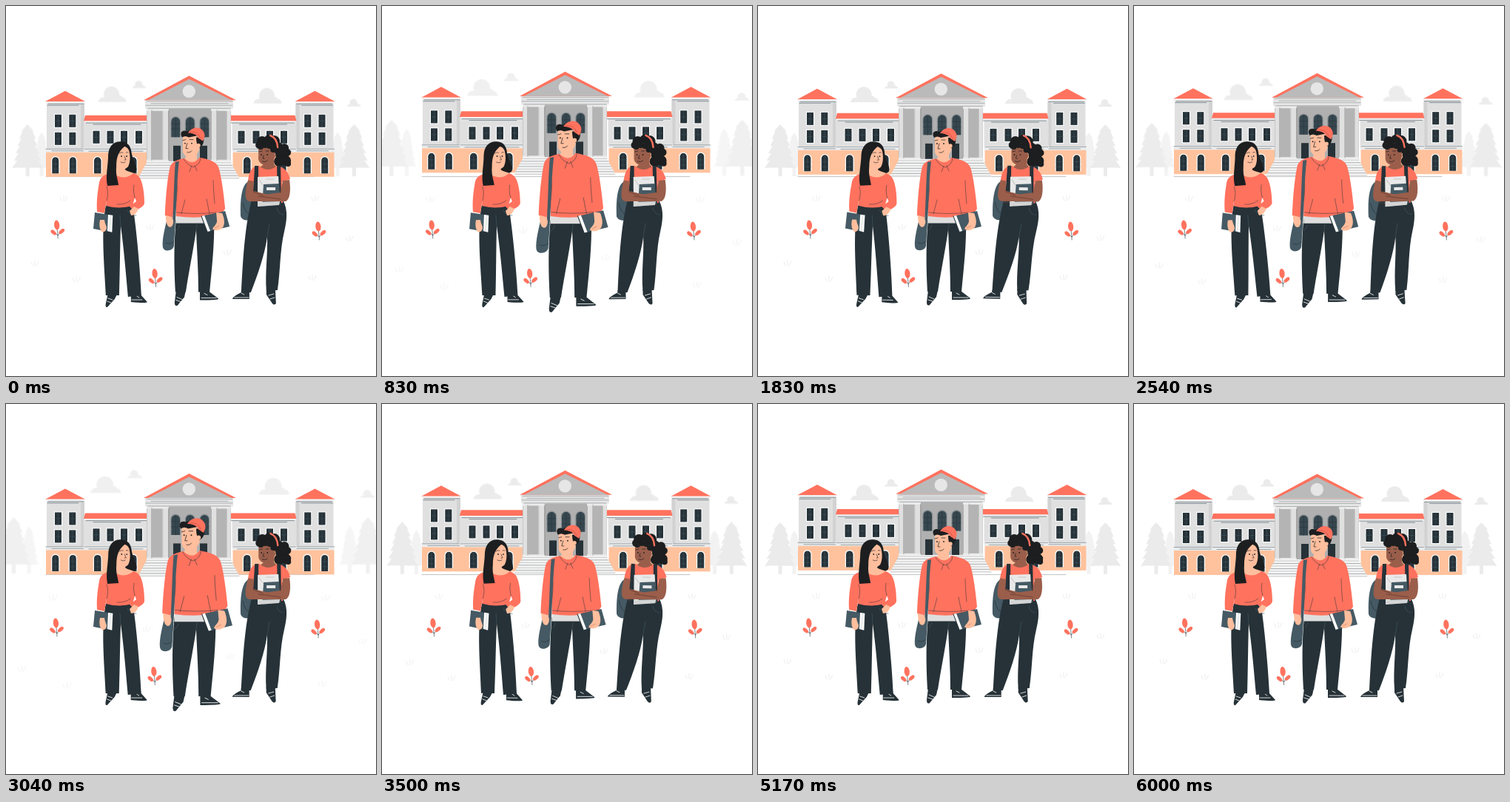
Write an HTML page that moves like this. It is 500 px wide and 500 px high and loops after 6.04 s.

```html
<!DOCTYPE html>
<html lang="en">
<head>
<meta charset="utf-8">
<title>Students on campus</title>
<style>
  html, body { margin: 0; width: 100%; height: 100%; overflow: hidden; background: #fff; }
  svg { display: block; width: 100vw; height: 100vh; }
</style>
</head>
<body>
<svg id="stage" viewBox="0 0 500 500"></svg>
<script>
const coral = '#ff725e', dark = '#263238', slate = '#455a64', ink = '#1c1e20',
  skin = '#ffbe9d', brown = '#9a5e4b', wall = '#e0e0e0', mid = '#c7c7c7', pale = '#ebebeb', peach = '#ffc29d';

const shape = (d, fill) => `<path d="${d}" fill="${fill}"/>`;
const line = (d, color = dark, w = .7) =>
  `<path d="${d}" fill="none" stroke="${color}" stroke-width="${w}" stroke-linecap="round" stroke-linejoin="round"/>`;
const rect = (x, y, w, h, fill) => `<rect x="${x}" y="${y}" width="${w}" height="${h}" fill="${fill}"/>`;
const dot = (x, y, r, fill) => `<circle cx="${x}" cy="${y}" r="${r}" fill="${fill}"/>`;
const oval = (x, y, rx, ry, turn, fill) =>
  `<ellipse rx="${rx}" ry="${ry}" transform="translate(${x} ${y}) rotate(${turn})" fill="${fill}"/>`;
const group = (id, body) => `<g id="${id}">${body}</g>`;
const at = (x, y, body, s = 1) => `<g transform="translate(${x} ${y}) scale(${s})">${body}</g>`;

// ---- scenery ----
function tree(x, top, half, bottom, fill) {
  const tiers = 6, step = (bottom - top) / tiers;
  let left = '', right = '';
  for (let i = 1; i <= tiers; i++) {
    const w = half * (.3 + .7 * i / tiers), y = top + i * step, inner = w * .75;
    right += `L${x + w} ${y}L${x + inner} ${y - .5}`;
    left = `L${x - inner} ${y - .5}L${x - w} ${y}` + left;
  }
  return shape(`M${x} ${top}${right}${left}Z`, fill) + rect(x - 2.5, bottom - 3, 5, 231 - bottom + 2, fill);
}

const cloud = (x, y, s) => at(x, y,
  shape('M-19 0A7 7 0 0 1-10.5-6A10.5 10.5 0 1 1 9.5-9A6 6 0 0 1 14-6A5.5 5.5 0 0 1 19 0Z', pale), s);

const tuft = ([x, y]) => at(x, y, line('M-5-2L-3 3M0-4V3M5-3L2 3', pale, .9));

const scenery =
  tree(49, 171, 12, 219, '#f2f2f2') + tree(447, 171, 13, 219, '#f2f2f2') +
  tree(30, 160, 21, 219, pale) + tree(469.5, 160, 21, 219, pale) +
  cloud(144, 130, 1) + cloud(180, 111.5, .48) + cloud(353, 132, 1) + cloud(469, 136, .48) +
  [[79, 260], [40, 348], [96, 369], [195, 299], [299, 333], [417, 260], [463, 314], [413, 367]].map(tuft).join('');

// ---- building ----
const pane = (x, y, w = 9, h = 17) =>
  rect(x - 1.1, y - 1.1, w + 2.2, h + 2.2, '#fff') + rect(x, y, w, h, dark) +
  line(`M${x + w / 2} ${y}v${h}M${x} ${y + h / 2}h${w}`, slate, .5);

function arch(x, y, w, h, frame = '#fff', glass = dark, bars = slate) {
  const curve = (g) => `M${x - g} ${y + h}V${y + w / 2}a${w / 2 + g} ${w / 2 + g} 0 0 1 ${w + 2 * g} 0V${y + h}Z`;
  return shape(curve(1.3), frame) + shape(curve(0), glass) +
    line(`M${x + w / 2} ${y + 1}v${h - 1}M${x} ${y + 9}h${w}M${x} ${y + 16}h${w}`, bars, .5);
}

const tower =
  rect(55, 130, 51, 67, wall) + rect(101, 133, 5, 64, '#d2d2d2') +
  shape('M53 129.3L80 115L107 129.3Z', coral) + rect(54, 129.3, 52, 2.7, '#f2f2f2') +
  line('M57 132.4H105M56 134.4H98', slate, .6) +
  [66, 85.3].map(x => pane(x, 147) + pane(x, 171)).join('') +
  rect(54, 193, 52, 5, pale) + line('M54 193.5H104M62 196H106', slate, .5) +
  rect(54, 198, 52, 33, peach) + arch(62.3, 204.5, 9, 22) + arch(85.8, 204.5, 9, 22);

const wing =
  rect(105, 155, 87, 41, wall) + shape('M107 148H194L195 155.6H105Z', coral) +
  rect(106, 155.6, 88, 2.2, '#f2f2f2') + line('M108 158.2H193M118 160.2H182', slate, .6) +
  [117.5, 136.5, 155, 175].map(x => pane(x, 169)).join('') +
  rect(105, 192, 86, 6, pale) + line('M106 193.5H190M112 196.5H185', slate, .5) +
  rect(105, 198, 86, 33, peach) + arch(119, 204.5, 9.5, 22) + arch(167, 204.5, 9.5, 22);

const column = (x, w, fill) => rect(x, 140, w, 72, fill) + rect(x - 1, 139, w + 2, 3, pale) + rect(x - 1, 208, w + 2, 4, pale);

function stairs() {
  let out = shape('M191 210H303L316 234H178Z', '#f4f4f4');
  for (let i = 0; i < 7; i++) out += line(`M${190 - i * 1.8} ${212 + i * 3.5}H${304 + i * 1.8}`, i % 2 ? '#8d9296' : '#b9b9b9', .7);
  return out;
}

const hall =
  rect(190, 137, 114, 75, mid) + rect(219, 139, 59, 73, '#b0b0b0') +
  [223.5, 243, 262.5].map(x => arch(x, 150.5, 11.5, 27, '#8f9497', '#37474f', dark)).join('') +
  [226, 244, 262].map(x => rect(x, 189, 10, 22, dark)).join('') +
  column(191, 5, wall) + column(198, 13, '#b4b4b4') + column(212.5, 6.5, wall) +
  column(278, 6.5, wall) + column(286, 12, '#b4b4b4') + column(299, 4.5, wall) +
  line('M197 141V209M220 141V209M285 141V209', '#8a8a8a', .6) +
  rect(188, 126, 119, 13, '#e6e6e6') +
  line('M190 129H306M196 132H300M189 134.5H306M192 138.5H303', '#858b8f', .6) +
  shape('M186 127.5L247.5 94.5L311 127.5Z', coral) + shape('M192 127.5L247.5 99L305 127.5Z', '#bababa') +
  dot(247.3, 115.5, 8.7, '#e6e6e6') + stairs();

const halves = tower + wing;
const building = halves + `<g transform="translate(497.5 0) scale(-1 1)">${halves}</g>` + hall;

// ---- plants ----
const plant =
  line('M1 13C1 8 0 4 0 0M1 9L-4 5M1 9L5 4', dark, .6) +
  oval(-.5, -5, 3.6, 6.5, -6, coral) + oval(-5, 5, 4.4, 2.5, 42, coral) + oval(6, 3.5, 4.6, 2.5, -42, coral);
const plants = [[69.2, 301], [201.6, 366.5], [422.4, 303]].map(([x, y]) => at(x, y, plant)).join('');

// ---- people ----
const laces = (d) => line(d, '#fff', .8);

const leftGirl =
  // legs and shoes
  shape('M138 388H151L147 396L137 407Q134 408 135 402Z', dark) + laces('M138 395l6 2M137 399l5 2') +
  shape('M169 390L182 390L191 400Q190 402 169 400Z', dark) + laces('M170 397H184M177 392l3 2') +
  shape('M135 269H171C175 290 181 350 183 391L165 393C162 360 159 325 155 297C154 330 154 360 153 391H135C133 350 128 302 135 269Z', dark) +
  line('M155 297L154 283M164 276Q168 284 176 283', slate, .6) +
  // hair behind the face
  shape('M150 185C160 181 167 186 169 195C170 207 178 217 176 223C172 228 166 226 162 222L147 214Z', ink) +
  // neck, face
  shape('M148 210L161 213V222L173 226L168 233Q155 238 145 230Z', skin) +
  shape('M147 197C151 188 162 187 166 195C168 202 168 211 165 217C160 223 150 221 147 214Z', skin) +
  // sweater
  shape('M144 226C134 227 128 230 126 238C124 250 122 262 123 278L133 280L136 261L135 270Q153 275 171 270L174 259L176 264L167 271L173 277C181 274 187 270 187 266C187 255 185 236 179 230Q176 227 172 226Q160 237 144 226Z', coral) +
  line('M136 263C138 256 138 250 136 244M174 259C172 252 172 247 173 242M150 268Q160 269 168 263', dark, .5) +
  shape('M173 271L179 274C177 280 173 283 169 283L167 277Z', skin) +
  // front hair
  shape('M159 184C147 181 139 188 138 201C138 216 134 230 137 243L152 242C151 234 148 229 149 217C149 204 152 196 161 189Z', ink) +
  dot(156, 203, .9, ink) + dot(163, 203, .9, ink) +
  line('M153 199q3-2 5-1M162 198q2-1 3 0M160 203l2 5-2 0M155 211q3 2 6 0', ink, .6) +
  // book and hand
  shape('M120 279L145 283L144 306L118 301Z', slate) + shape('M138 282L145 283L144 306L137 304Z', '#fff') +
  line('M141 284L140 304', '#bbb', .6) + line('M145 283L144 306', dark, 1.4) +
  shape('M127 289L133 289C133 293 136 297 136 300C135 306 130 307 128 303C126 299 126 294 127 289Z', skin);

const man =
  // shoes and legs
  shape('M230 384H243L241 393L232 404Q228 406 228 400Z', dark) + laces('M231 393l7 3M230 397l6 2') +
  shape('M262 385H274L287 395Q288 397 262 397Z', dark) + laces('M264 394H284M268 388l4 2') +
  shape('M230 288H281C282 320 278 355 275 386H260C260 358 258 330 257 303C253 330 247 360 243 386H229C227 350 227 320 230 288Z', dark) +
  rect(230, 281, 53, 12.5, '#dedede') + line('M257 303L258 294M235 296Q234 301 230 303', slate, .6) +
  // neck and face
  shape('M242 196L258 194V207Q262 211 252 215Q243 213 240 208L243 205Z', skin) +
  shape('M239 178C247 173 259 174 261 181C264 190 261 201 253 204C246 206 240 203 239 197Z', skin) +
  // hoodie
  shape('M241 206C232 208 225 210 222 217C219 229 216 255 215 283L225 286L230 264L230 284Q257 288 284 283L281 266L282 280L291 281L296 274C294 254 291 230 287 218C284 210 273 207 261 205Q253 217 241 206Z', coral) +
  line('M230 264C231 255 232 247 231 239M282 267C281 257 280 246 280 236M231 279Q258 282 284 279M240 207Q246 216 253 218Q262 215 263 206M251 216l-3 8M255 216l3 7M237 281L242 262M275 281L271 261', dark, .5) +
  // face details
  shape('M238 178C234 171 239 167 245 170C251 166 259 168 262 175L247 178Q242 175 238 178Z', ink) +
  shape('M257 178H267C268 184 266 190 261 192Q257 188 257 178Z', ink) + dot(260, 189, 2.7, skin) +
  shape('M246 172C250 165 259 163 264 167C269 171 270 176 266 183L260 179C258 174 252 172 246 172Z', coral) +
  line('M249 171Q259 169 263 179', '#b84f43', .6) +
  dot(242, 186, .9, ink) + dot(251, 186, .9, ink) +
  line('M239 182l4-1M248 181l5 0M245 186l-2 7 3 0M245 198q4 1 6-2', ink, .7) +
  // strap and bag
  shape('M229 211L234 210C231 234 231 264 229 292L225 293C227 265 227 235 229 211Z', slate) +
  shape('M218 287C222 284 229 288 229 294L227 324C226 331 213 333 212 325C211 315 215 300 218 287Z', slate) +
  line('M216 320Q222 323 227 318', dark, .6) +
  shape('M216 283L224 285C227 289 227 294 224 298C219 301 216 294 216 283Z', skin) +
  // book and hand
  shape('M264 284L296 277L302 298L272 305Z', slate) + shape('M264 284L268 283L276 304L272 305Z', '#fff') +
  line('M264 284L272 305', dark, 1) +
  shape('M284 279L292 280C295 287 296 294 293 299C289 304 282 304 279 301C281 297 284 296 285 291Z', skin) +
  line('M282 300L288 297', '#c9795f', .6);

const curls = [[346, 183, 7], [355, 180, 6], [362, 183, 8], [342, 188, 5], [367, 192, 8], [376, 192, 6],
  [380, 198, 5], [373, 201, 9], [378, 209, 7], [369, 210, 7], [381, 213, 4]];

const rightGirl =
  // shoes and legs
  shape('M318 384H329V396H306Q306 393 318 387Z', dark) + laces('M309 394H328M318 388l4 2') +
  shape('M352 382H364L365 402Q363 405 360 402L352 390Z', dark) + laces('M355 391l7-2M357 396l6-2') +
  // backpack
  shape('M328 237C319 240 316 260 317 284C319 290 327 291 333 288L336 242Z', slate) +
  line('M320 266Q322 280 332 283', dark, .7) +
  shape('M332 262H374C382 276 379 292 376 305C370 330 371 358 367 384L352 385C350 360 354 335 353 312C350 335 340 364 331 387H318C320 350 322 300 332 262Z', dark) +
  line('M353 312L356 294M366 273Q367 281 375 282', slate, .6) +
  // hair, neck, face
  curls.map(c => dot(...c, ink)).join('') +
  shape('M347 205L362 204V214L367 219L354 226L342 219L348 214Z', brown) +
  shape('M341 191C346 186 358 185 362 192C365 200 363 210 356 214C349 217 342 213 341 207Z', brown) +
  [[344, 190, 4], [350, 188, 4], [356, 189, 4], [361, 194, 4]].map(c => dot(...c, ink)).join('') +
  line('M357 175Q366 178 367 191', coral, 2.4) +
  dot(345, 201, .9, ink) + dot(353, 201, .9, ink) + dot(361.5, 203, 2.3, brown) +
  line('M342 197l4-1M351 196l4 0M348 202l-1 4 2 0M346 210q4 2 7-1', ink, .7) +
  // shirt and straps
  shape('M342 216C334 216 329 221 327 235L335 238L333 266H374L373 238L384 234C381 222 374 217 366 216Q354 226 342 216Z', coral) +
  shape('M336 216H341L341 266H333Z', dark) + shape('M366 216H371L372 266H367Z', dark) +
  // papers and notebook
  shape('M340 231L368 230L370 266L340 271Z', '#e9e9e9') + line('M342 235L365 266M352 234l10 0', mid, 1) +
  shape('M348 241L369 240L371 268L346 271Z', slate) + rect(352, 245, 12, 4, '#e9e9e9') +
  // crossed arms
  shape('M327 235L335 237L334 250L368 258L366 264L330 264C321 264 323 251 327 235Z', brown) +
  shape('M374 236L383 235C385 249 384 261 378 264L348 264L338 262Q335 258 342 256L371 252Z', brown) +
  line('M341 257L371 261M334 251L347 256M371 252L369 247', '#552f25', .6) +
  shape('M340 265L370 264L369 269L340 271Z', '#d5d5d5');

document.getElementById('stage').innerHTML =
  group('scenery', scenery) + line('M54 230.6H416', '#a5a9ab', .7) + group('building', building) +
  group('plants', plants) + group('leftGirl', leftGirl) + group('man', man) + group('rightGirl', rightGirl);

// ---- motion ----
const loop = 6040;
const find = (id) => document.getElementById(id);
const move = (id, value) => find(id).setAttribute('transform', value);

// Linear interpolation through [time, value] keys.
function keyed(keys, t) {
  for (let i = 1; i < keys.length; i++) {
    const [t0, v0] = keys[i - 1], [t1, v1] = keys[i];
    if (t <= t1) return v0 + (v1 - v0) * (t - t0) / (t1 - t0);
  }
  return keys[keys.length - 1][1];
}
const beatKeys = [[0, 0], [600, 1], [1800, 0], [2400, 0], [3000, 1], [3600, 0]];
const floatKeys = [[0, 0], [750, 1], [1500, 0]];
const windKeys = [[0, 0], [375, 1], [1125, -1], [1500, 0]];
const zoom = (x, y, s) => `translate(${x} ${y}) scale(${s}) translate(${-x} ${-y})`;

function draw(now) {
  const t = (now + 25) % loop, beat = keyed(beatKeys, t);
  const cycle = Math.min(t, 6000) % 1500, wind = keyed(windKeys, cycle);
  move('scenery', zoom(250, 240, 1 + beat * .1));
  find('scenery').setAttribute('opacity', 1 - beat * .3);
  move('man', zoom(257, 285, 1 + beat * .1));
  move('building', `translate(0 ${-6.6 * keyed(floatKeys, cycle)})`);
  move('plants', `translate(${.8 * wind - 1.6 * beat} 0)`);
  move('leftGirl', `rotate(${wind} 155 296)`);
  move('rightGirl', `rotate(${wind} 350 290)`);
}

const start = performance.now();
function frame() {
  draw(performance.now() - start);
  requestAnimationFrame(frame);
}
frame();
</script>
</body>
</html>
```
